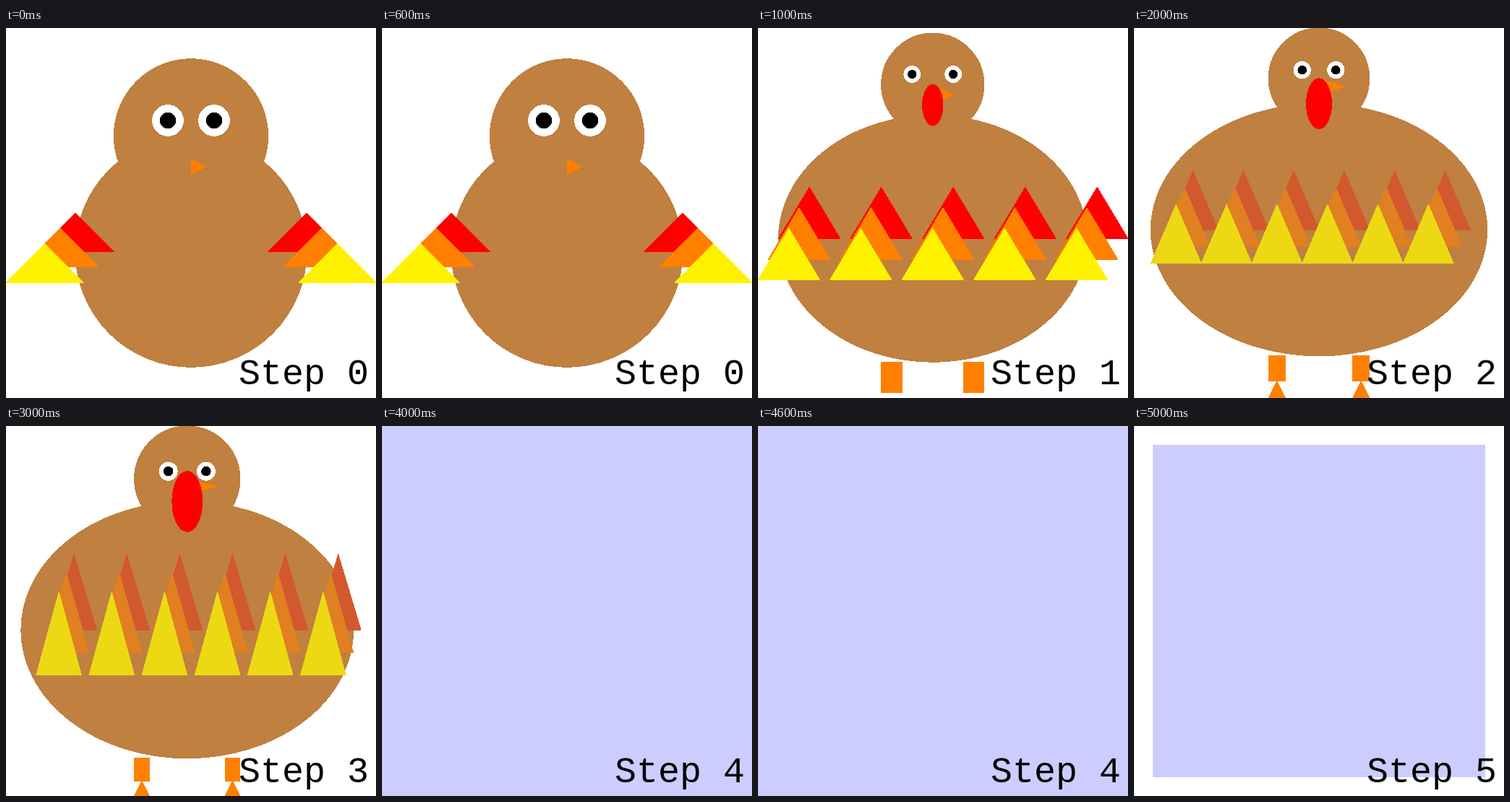
Recreate the animation shown at these times as an HTML page. Size 512 by 512 pixels, loop 6 s.

```html
<!DOCTYPE html>
<html lang="en">
<head>
<meta charset="utf-8">
<title>Turkey steps</title>
<style>
  html, body { margin: 0; width: 100%; height: 100%; overflow: hidden; background: #fff; }
  svg { display: block; width: 100vw; height: 100vh; }
  #scene { shape-rendering: crispEdges; stroke-width: 1; stroke-linejoin: round; }
  #scene * { vector-effect: non-scaling-stroke; }
  text { font: 50px "Liberation Mono", monospace; white-space: pre; }
</style>
</head>
<body>
<svg viewBox="0 0 512 512">
  <g id="scene"></g>
  <text id="label" x="322" y="493"></text>
</svg>
<script>
const SIZE = 512, STEP_MS = 1000;
const BROWN = '#bf8040', ORANGE = '#ff8000', RED = '#ff0000', LILAC = '#ccccff';
const BRIGHT = [RED, ORANGE, '#fff200'];
const MUTED = ['#d2582d', '#e08020', '#ecd914'];

const paint = color => `fill="${color}" stroke="${color}"`;
const ellipse = (x, y, rx, ry, color) =>
  `<ellipse cx="${x}" cy="${y}" rx="${rx}" ry="${ry}" ${paint(color)}/>`;
const circle = (x, y, r, color) => ellipse(x, y, r, r, color);
const rect = (x, y, w, h, color) =>
  `<rect x="${x}" y="${y}" width="${w}" height="${h}" ${paint(color)}/>`;
const polygon = (points, color) => `<polygon points="${points}" ${paint(color)}/>`;
const triangle = (x, top, half, base, color) =>
  polygon([x, top, x + half, base, x - half, base], color);

const eyes = (x, gap, y, r) => [x - gap, x + gap].map(cx =>
  circle(cx, y, r, '#fff') + circle(cx, y, r / 2, '#000')).join('');

const beak = (x, y, length, half) =>
  polygon([x, y - half, x + length, y, x, y + half], ORANGE);

// Three overlapping triangles, each shifted from the one before it.
const feather = (x, top, half, base, dx, dTop, dBase, colors) => colors.map((color, i) =>
  triangle(x + i * dx, top + i * dTop, half, base + i * dBase, color)).join('');

const featherRow = (count, spacing, x, ...shape) =>
  Array.from({ length: count }, (_, i) => feather(x + i * spacing, ...shape)).join('');

const legs = (xs, y, toes) => xs.map(x =>
  rect(x, y, 2, 3, ORANGE) + (toes ? triangle(x + 1, y + 3, 1, y + 5, ORANGE) : '')).join('');

// Each scene is drawn in a square grid with its own number of units per side.
const grid = (units, ...parts) => `<g transform="scale(${SIZE / units})">${parts.join('')}</g>`;

const scenes = [
  grid(24,
    circle(12, 14.5, 7.5, BROWN), circle(12, 7, 5, BROWN),
    eyes(12, 1.5, 6, 1), beak(12, 9, 1, .5),
    feather(4.5, 12, 2.5, 14.5, -1, 1, 1, BRIGHT),
    feather(19.5, 12, 2.5, 14.5, 1, 1, 1, BRIGHT)),
  grid(36,
    ellipse(17, 20.5, 15, 12, BROWN), circle(17, 5.5, 5, BROWN),
    eyes(17, 2, 4.5, .8), beak(17, 6.5, 2, 1), ellipse(17, 7.5, 1, 2, RED),
    featherRow(5, 7, 5, 15.5, 3, 20.5, -1, 2, 2, BRIGHT),
    legs([12, 20], 32.5, false)),
  grid(44,
    ellipse(22, 24, 20, 15, BROWN), circle(22, 6, 6, BROWN),
    eyes(22, 2, 5, 1), beak(22, 7, 3, 1), ellipse(22, 9, 1.5, 3, RED),
    featherRow(6, 6, 7, 17, 3, 24, -1, 2, 2, MUTED),
    legs([16, 26], 39, true)),
  grid(49,
    ellipse(24, 27, 22, 17, BROWN), circle(24, 7, 7, BROWN),
    eyes(24, 2.5, 6, 1.2), beak(24, 8, 4, 1), ellipse(24, 10, 2, 4, RED),
    featherRow(6, 7, 9, 17, 3, 27, -1, 2.5, 3, MUTED),
    legs([17, 29], 44, true)),
  grid(1, rect(0, 0, 1, 1, LILAC)),
  `<rect x="26" y="26" width="460" height="460" fill="${LILAC}"/>`
];

const scene = document.getElementById('scene');
const label = document.getElementById('label');
const start = performance.now();
let shown = -1;

function render() {
  const step = Math.floor((performance.now() - start) / STEP_MS) % scenes.length;
  if (step !== shown) {
    scene.innerHTML = scenes[step];
    label.textContent = `Step ${step}`;
    shown = step;
  }
  requestAnimationFrame(render);
}
render();
</script>
</body>
</html>
```
